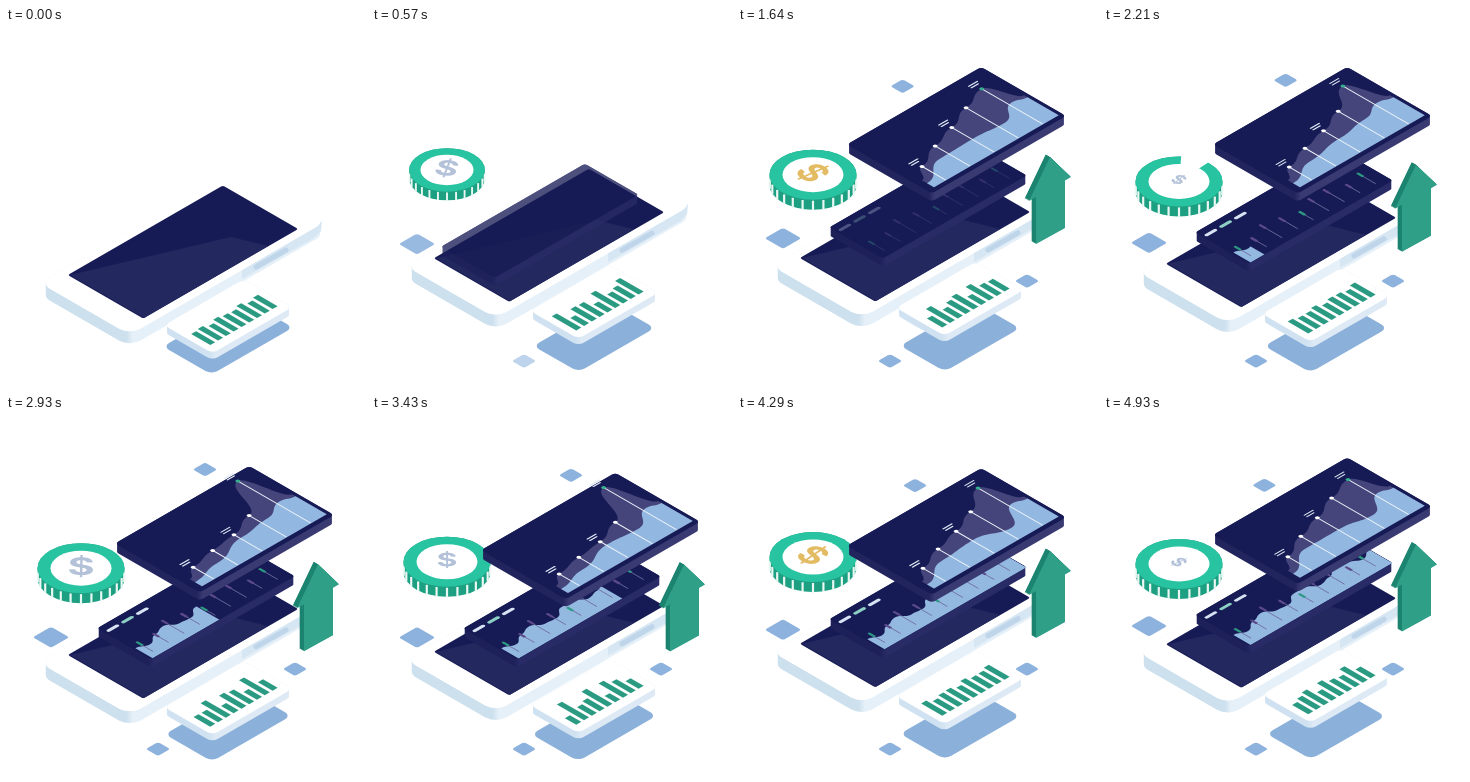
An HTML page with a canvas for the animation above (5 s loop, 360 px wide and 360 px high).

```html
<!DOCTYPE html>
<html>
<head>
<meta charset="utf-8">
<style>
html, body { margin: 0; width: 100%; height: 100%; overflow: hidden; background: #fff; }
canvas { display: block; }
</style>
</head>
<body>
<canvas id="stage" width="360" height="360"></canvas>
<script>
const LOOP = 5000, FLOAT = 3500;
const NAVY = '#171b55', GREEN = '#2b9a82', BLUE = '#8db2dd';
const stage = document.getElementById('stage').getContext('2d');
const layer = Object.assign(document.createElement('canvas'), { width: 360, height: 360 });
let g = stage;

// Timing helpers
const clamp = x => Math.max(0, Math.min(1, x));
const ramp = (t, start, length) => clamp((t - start) / length);
const remaining = (t, start, length) => (1 - ramp(t, start, length)) ** 3;
const wave = (t, peak, period = FLOAT) => Math.cos(2 * Math.PI * (t - peak) / period);

// Isometric plane: u runs up-right, v runs down-right
const iso = (x, y) => g.setTransform(.866, -.5, .866, .5, x, y);
const flat = (x = 0, y = 0) => g.setTransform(1, 0, 0, 1, x, y);

function fade(alpha, draw) {
  if (alpha <= 0) return;
  g = layer.getContext('2d');
  flat();
  g.clearRect(0, 0, 360, 360);
  draw();
  g = stage;
  flat();
  g.globalAlpha = alpha;
  g.drawImage(layer, 0, 0);
  g.globalAlpha = 1;
}

function plate(x, y, length, width, radius, color) {
  iso(x, y);
  g.beginPath();
  g.roundRect(-length / 2, -width / 2, length, width, radius);
  g.fillStyle = color;
  g.fill();
  flat();
}

function slab(x, y, length, width, radius, depth, top, left, right) {
  const edge = x + .433 * (width - length);
  const sides = g.createLinearGradient(edge - 3, 0, edge + 3, 0);
  sides.addColorStop(0, left);
  sides.addColorStop(1, right);
  g.beginPath();
  for (let d = depth; d >= 0; d--) {
    iso(x, y + d);
    g.roundRect(-length / 2, -width / 2, length, width, radius);
  }
  flat();
  g.fillStyle = sides;
  g.fill();
  plate(x, y, length, width, radius, top);
}

function line(x1, y1, x2, y2, color, width, cap = 'round') {
  g.beginPath();
  g.moveTo(x1, y1);
  g.lineTo(x2, y2);
  g.strokeStyle = color;
  g.lineWidth = width;
  g.lineCap = cap;
  g.stroke();
}

function polygon(points, color) {
  g.beginPath();
  points.forEach(p => g.lineTo(...p));
  g.closePath();
  g.fillStyle = color;
  g.fill();
}

// Smooth filled curve standing on the line v = base
function area(points, base, color) {
  const last = points[points.length - 1];
  g.beginPath();
  g.moveTo(points[0][0], base);
  g.lineTo(...points[0]);
  for (let i = 1; i < points.length; i++) {
    const [u0, v0] = points[i - 1], [u1, v1] = points[i], mid = (u0 + u1) / 2;
    g.bezierCurveTo(mid, v0, mid, v1, u1, v1);
  }
  g.lineTo(last[0], base);
  g.fillStyle = color;
  g.fill();
}

function tile(x, y, size, alpha = 1) {
  g.globalAlpha = alpha;
  plate(x, y, size, size, 2.5, BLUE);
  g.globalAlpha = 1;
}

function phone(t) {
  const y = 210 - 6 * wave(t, 1070) + 12 * remaining(t, 0, 1000);
  slab(177, y, 227, 104, 12, 12, '#fff', '#cde0ee', '#e6f0f8');
  flat(177, y);
  polygon([[59, 18], [134, -26], [139, -31], [138, -21], [131, -14], [59, 27]], '#d6e6f3');
  plate(177, y, 227, 104, 12, '#fff');
  flat(177, y);
  line(73, 15, 103, -2, '#bfd5ea', 5);
  plate(177, y, 179, 87, 2, NAVY);
  flat(177, y);
  polygon([[-113, 23], [48, -15], [85, -6], [-39, 66]], '#23285f');
  flat();
}

function card(t) {
  const y = 275.5 - 6.5 * wave(t, 1230) + 9 * remaining(t, 0, 1000);
  const s = 1 - .0045 * (288 - y);
  plate(222, 309, 94 * s, 56 * s, 7, '#8bb1db');
  slab(222, y, 92, 56, 6, 7, '#fff', '#d0e2f1', '#dde9f5');
  iso(222, y);
  g.fillStyle = GREEN;
  const swing = 6 + 4 * wave(t, 1070, 2250);
  for (let i = 0; i < 9; i++) {
    const h = 22 + swing * Math.sin(i * 2.4 + t / 300);
    g.fillRect(-39 + 9 * i, 18.5 - h, 5.8, h);
  }
  flat();
}

function coin(t) {
  const grow = 1 - remaining(t, 300, 550);
  if (!grow) return;
  const y = 147.5 + 7 * wave(t, 2500, 3200);
  g.setTransform(grow, 0, 0, grow, 75, y);

  g.beginPath();
  g.ellipse(0, 10, 43.5, 25, 0, 0, Math.PI);
  g.ellipse(0, 0, 43.5, 25, 0, Math.PI, 0);
  g.fillStyle = '#1d9f82';
  g.fill();
  for (let i = 0; i < 13; i++) {
    const a = (i + .5) * Math.PI / 13, x = 43.5 * Math.cos(a), v = 25 * Math.sin(a);
    line(x, v + 1, x, v + 11, '#e9f8f3', 2.2, 'butt');
  }
  g.beginPath();
  g.ellipse(0, 0, 43.5, 25, 0, 0, 7);
  g.fillStyle = '#28c3a0';
  g.fill();
  const gap = .68 * (1 - clamp(Math.abs(t - 2210) / 250));
  if (gap) {
    g.beginPath();
    g.moveTo(0, 0);
    g.ellipse(0, 0, 45, 26, 0, -1.52, -1.52 + gap);
    g.fillStyle = '#fff';
    g.fill();
  }
  g.beginPath();
  g.ellipse(0, 0, 30.5, 17.5, 0, 0, 7);
  g.fillStyle = '#fff';
  g.fill();

  // The symbol shrinks and swaps colour at each turn
  const turn = (t - 850) / 1360;
  const size = Math.min(1, .5 + .85 * Math.abs(Math.sin(Math.PI * turn))) * grow;
  iso(75, y - 2);
  g.rotate((70 - 28 * wave(t, 3200, 3200)) * Math.PI / 180);
  g.scale(size, size);
  g.font = 'bold 34px Inter, sans-serif';
  g.textAlign = 'center';
  g.textBaseline = 'middle';
  g.fillStyle = Math.floor(turn) % 2 ? '#b3c2d8' : '#e2bb63';
  g.fillText('$', 0, 2);
  flat();
}

function lowerPanel(t) {
  const slide = 60 * remaining(t, 250, 1300);
  const x = 190 - .866 * slide;
  const y = 180 - 7 * wave(t, 1450) + .5 * slide;
  slab(x, y, 166, 62, 3, 8, NAVY, '#1d2059', '#292b66');
  const shown = ramp(t, 1500, 500);
  if (!shown) return;
  iso(x, y);
  g.globalAlpha = shown;
  for (let i = 0; i < 3; i++)
    line(-79 + 17 * i, -22, -69 + 17 * i, -22, i === 1 ? '#8fd0c6' : '#d6e4f3', 3.4);

  const reveal = clamp((t - 2000) * .085 / 166) * 166;
  g.save();
  g.beginPath();
  g.rect(-83, -31, reveal, 62);
  g.clip();
  const profile = [];
  for (let i = 0; i < 14; i++)
    profile.push([-81 + 12.6 * i, 11 + 5 * Math.sin(i * 1.7) - .5 * i]);
  area(profile, 31, '#94b9e0');
  g.restore();

  for (let i = 0; i < 9; i++) {
    const u = -74 + 18 * i, v = 3 + 5 * Math.sin(i * 1.9 + .5);
    line(u, v, u, 24, '#6d6c9e', .8);
    line(u, v, u, v + 7, i % 4 ? '#5d4a8c' : GREEN, 2.6, 'butt');
  }
  g.globalAlpha = 1;
  flat();
}

function upperPanel(t) {
  const slide = 60 * remaining(t, 750, 920);
  const x = 218.5 - .866 * slide;
  const y = 111 - 10 * wave(t, 1930) + .5 * slide;
  slab(x, y, 155, 98, 4, 8, NAVY, '#22245d', '#3a3a73');
  iso(x, y);
  g.globalAlpha = ramp(t, 750, 550);
  const s = -wave(t, 1450);
  const dots = [[-56, 18 + 2 * s], [-28, 9 + 6 * s], [0, 3 + 9 * s],
    [28, -8 + 9.5 * s], [56, -34 - 7.5 * s]];
  area([[-70, 30], ...dots, [74, 4]], 44, '#45457b');
  area([[-70, 36], [-38, 24 + 6 * wave(t, 3100)], [2, 18],
    [36, 20 + 8 * wave(t, 4290)], [60, 4], [74, 8]], 44, '#92b7e0');
  dots.forEach(([u, v], i) => {
    line(u, v, u, 43, '#eef4fb', 1.1);
    g.beginPath();
    g.arc(u, v, 2, 0, 7);
    g.fillStyle = i === 4 ? '#35b08f' : '#fff';
    g.fill();
    if (i % 2 === 0) {
      line(u - 5, v - 10, u + 5, v - 10, '#dfe9f5', 1.3);
      line(u - 5, v - 7, u + 3, v - 7, '#dfe9f5', 1.3);
    }
  });
  g.globalAlpha = 1;
  flat();
}

function arrow(t) {
  const y = 139 - 10.5 * wave(t, 1450) + 50 * remaining(t, 600, 750);
  const shape = [[312, 0], [333, 20], [327, 23.5], [327, 71], [298, 87], [298, 40], [291, 44]];
  for (let d = 5; d >= 0; d -= .5)
    polygon(shape.map(([px, py]) => [px - .866 * d, y + py - .5 * d]), d ? '#1c8470' : '#2f9f88');
}

function draw(t) {
  flat();
  g.fillStyle = '#fff';
  g.fillRect(0, 0, 360, 360);
  phone(t);
  card(t);

  const drift = remaining(t, 700, 1000);
  tile(45, 216 - 6 * wave(t, 1450), 21, ramp(t, 300, 300));
  tile(152, 333, 14, ramp(t, 400, 300));
  tile(289, 253, 14, ramp(t, 1250, 350));
  tile(179 + 21.5 * wave(t, 3180, 4200) - 80 * drift,
    61 - 9.5 * wave(t, 2500, 4200) + 72 * drift, 14, ramp(t, 750, 500));

  coin(t);
  fade(ramp(t, 250, 420), () => lowerPanel(t));
  fade(ramp(t, 750, 420), () => upperPanel(t));
  fade(ramp(t, 600, 350), () => arrow(t));
}

const start = performance.now();
function tick() {
  draw((performance.now() - start) % LOOP);
  requestAnimationFrame(tick);
}
tick();
</script>
</body>
</html>
```
